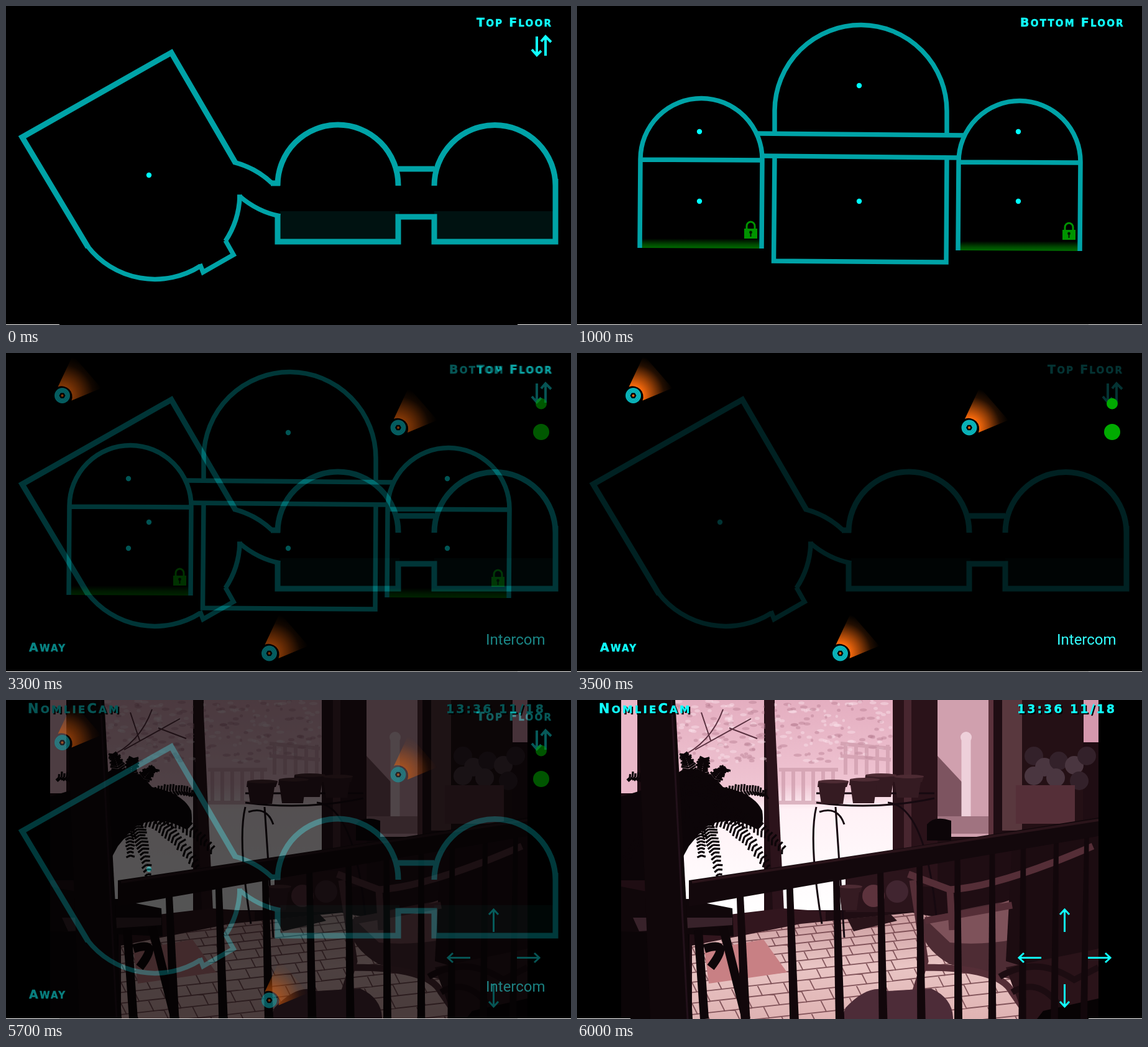
An HTML page for the animation above (8000 ms loop, 909 by 513 pixels).

```html
<!DOCTYPE html>
<html lang="en">
<head>
<meta charset="utf-8">
<title>House control panel</title>
<style>
  html, body { margin: 0; width: 100%; height: 100%; overflow: hidden; background: #000; }
  svg { display: block; width: 100vw; height: 100vh; isolation: isolate; }
  .layer { mix-blend-mode: plus-lighter; }
  .caps { font-family: "DejaVu Sans", sans-serif; font-weight: bold; stroke-width: .4; }
  .plain { font: 24px Roboto, sans-serif; fill: #3ff; }
  .wall { fill: none; stroke: #00a3a7; stroke-width: 9; }
  .thin { stroke-width: 7.5; }
  .arrow { fill: none; stroke: #1ff; stroke-width: 3; }
</style>
</head>
<body>
<svg id="stage" viewBox="0 0 909 513" xmlns="http://www.w3.org/2000/svg"></svg>
<script>
const FADES = [500, 3000, 5500], STEP = 100, STEPS = 6, LOOP = 8000;
const FLOOR = 'M185 395L360 360L540 342L839 400V513H185Z';
const stage = document.getElementById('stage');

const path = (d, attrs) => `<path d="${d}" ${attrs}/>`;
const wall = (d, thin) => path(d, `class="wall${thin ? ' thin' : ''}"`);
const shape = (d, fill) => path(d, `fill="${fill}"`);
const line = (d, color, width) => path(d, `fill="none" stroke="${color}" stroke-width="${width}"`);
const rect = (x, y, w, h, fill) => `<rect x="${x}" y="${y}" width="${w}" height="${h}" fill="${fill}"/>`;
const disc = (x, y, r, fill) => `<circle cx="${x}" cy="${y}" r="${r}" fill="${fill}"/>`;
const dot = (x, y) => disc(x, y, 4.2, '#0ff');
const layer = (id, body) => `<g id="${id}" class="layer">${body}</g>`;
const label = (x, y, words, big = 19, spacing = 2.2, color = '#1ff') => {
  const spans = words.replace(/[A-Z][a-z]*|[^A-Za-z]+/g, part =>
    `<tspan font-size="${big}">${part[0]}</tspan>` + (part.length > 1
      ? `<tspan font-size="${/[a-z]/.test(part) ? big * 0.79 : big}">${part.slice(1).toUpperCase()}</tspan>` : ''));
  return `<text class="caps" xml:space="preserve" x="${x}" y="${y}" letter-spacing="${spacing}" fill="${color}" stroke="${color}">${spans}</text>`;
};

function random(seed) {
  return () => (seed = (seed * 16807) % 2147483647) / 2147483647;
}

function topFloor() {
  return rect(441, 330, 192, 47, '#001211') + rect(689, 330, 191, 47, '#001211')
    + wall('M132 388L26 211L266 75L369 252')
    + wall('M366 251Q402 260 428 285', true) + wall('M426 285H441')
    + wall('M437 289V288A97 97 0 0 1 631 288V289M631 262H689M689 289A97.5 97.5 0 0 1 884 289M884 278V379H689V339H631V379H437V334')
    + wall('M441 338Q405 331 376 306', true)
    + wall('M372 307H376A137 137 0 0 1 353 378', true)
    + wall('M353 377L366 400L317 428L312 415', true)
    + wall('M313 418A137 137 0 0 1 131 386', true)
    + dot(230, 272) + label(757, 33, 'Top Floor')
    + path('M854 49V78M846 70L854 79L861 72M868 80V50M861 57L868 49L877 58', 'class="arrow" style="stroke-width:4"');
}

function lock(x, y) {
  return line(`M${x - 6.5} ${y - 1}V${y - 6}a6.5 7 0 0 1 13 0V${y - 1}`, '#009400', 3)
    + rect(x - 10.5, y - 2, 21, 16, '#009400') + disc(x, y + 4, 2.4, '#001800') + rect(x - 1, y + 5, 2, 6, '#001800');
}

function bottomFloor() {
  return shape('M104 374L295 375V390L104 389Z', 'url(#glow)') + shape('M616 378L807 379V394L616 393Z', 'url(#glow)')
    + wall('M318 206V168A138.5 138.5 0 0 1 595 170V207M318 241L316.5 410L594 412L595 243', true)
    + wall('M290 205L624 208M298 241L616 244', true)
    + wall('M101 389L102 246A98 98 0 0 1 298 247L297 390M102 247L298 248', true)
    + wall('M613 393L614 250A98 98 0 0 1 810 251L809 394M614 251L810 252', true)
    + [[197, 202], [197, 314], [454, 128], [454, 314], [710, 202], [710, 314]].map(p => dot(...p)).join('')
    + lock(279.5, 360) + lock(791.5, 362) + label(713, 33, 'Bottom Floor');
}

function camera(x, y) {
  return `<g transform="translate(${x} ${y})">`
    + shape('M-7 -14L17 -65L63 -12L15 8A17 17 0 0 0 -7 -14Z', 'url(#beam)')
    + disc(0, 0, 12.5, '#00a9b0')
    + [6, 8.5, 11].map(r => `<circle r="${r}" fill="none" stroke="#28c8cb" stroke-width=".7"/>`).join('')
    + shape('M-5 0L-2.5 -4.3H2.5L5 0L2.5 4.3H-2.5Z', '#000') + disc(0, 0, 2, '#e86510') + '</g>';
}

function controls() {
  return camera(90.5, 68.5) + camera(631, 120) + camera(423.5, 483)
    + disc(861, 81.5, 9, '#0a0') + disc(861, 127, 13, '#0a0')
    + label(37, 480, 'Away') + '<text class="plain" x="772" y="469">Intercom</text>';
}

function tiles() {
  let d = '';
  for (let row = 0, y = 330; y < 560; row++) {
    const depth = 11 + row * 0.9, width = 28 + row * 2;
    d += `M180 ${y + 45}L720 ${y - 15}`;
    for (let x = 185 + (row % 2) * width / 2; x < 720; x += width) {
      const top = y + 45 - (x - 180) / 9;
      d += `M${x} ${top}l${depth * 0.5} ${depth}`;
    }
    y += depth;
  }
  return shape(FLOOR, 'url(#floor)')
    + path(d, 'stroke="#6a3b43" stroke-width="1.8" opacity=".8" clip-path="url(#floorClip)"');
}

function fern() {
  const rnd = random(17);
  const tips = [[172, 88], [205, 95], [240, 112], [303, 152], [306, 268], [228, 280], [200, 250], [130, 205], [85, 125], [80, 255], [330, 240]];
  let d = '';
  for (const [x, y] of tips) {
    const angle = Math.atan2(y - 180, x - 195);
    for (let i = 4; i <= 22; i++) {
      const u = i / 22, bend = 70 * u * (1 - u);
      const px = 195 + (x - 195) * u + bend * Math.cos(angle) * 0.3, py = 180 + (y - 180) * u - bend;
      const reach = 5 + 10 * (1 - u) + 4 * rnd();
      for (const side of [angle + 1.2, angle - 1.2]) {
        d += `M${px} ${py}l${reach * Math.cos(side)} ${reach * Math.sin(side)}`;
      }
    }
  }
  return shape('M71 155Q130 140 170 112Q205 105 235 140Q285 150 298 178Q302 205 290 208Q245 182 205 205L180 235L150 290H71Z', '#0c0508')
    + line(d, '#0c0508', 3.2);
}

function foliage() {
  const rnd = random(5);
  let out = '';
  for (let i = 0; i < 260; i++) {
    const x = 160 + rnd() * 345, y = rnd() * 100;
    out += `<ellipse cx="${x.toFixed(1)}" cy="${y.toFixed(1)}" rx="${(2 + rnd() * 5).toFixed(1)}" ry="2.5" fill="${rnd() < 0.5 ? '#b97f92' : '#fbe3ec'}" opacity=".45"/>`;
  }
  return out + line('M165 92Q215 70 235 15M190 80L280 30M215 65L200 20M245 45L290 62', '#59303f', 2);
}

function fence() {
  const low = Array.from({length: 6}, (_, i) => `M${332 + i * 16} 110V165`);
  const high = Array.from({length: 5}, (_, i) => `M${432 + i * 17} 72V120`);
  return path('M325 112H420M325 165H420M424 70L505 78M424 90L505 96' + low.join('') + high.join(''),
    'fill="none" stroke="#c995a6" stroke-width="6" opacity=".6"');
}

function pot(x, y, w, h) {
  return shape(`M${x} ${y}h${w}l-3 9h-2l-4 ${h - 9}h${14 - w}l-4 ${9 - h}h-2Z`, '#351b22')
    + `<ellipse cx="${x + w / 2}" cy="${y}" rx="${w / 2}" ry="3" fill="#4d2b33"/>`;
}

function windows() {
  return rect(71, 0, 26, 150, '#eab8c9') + rect(158, 0, 143, 345, 'url(#view)')
    + rect(318, 0, 190, 338, 'url(#view)') + foliage() + fence()
    + shape('M301 0H317L334 360H316Z', '#2c131b') + rect(508, 0, 72, 300, '#2a1219') + rect(526, 0, 12, 240, '#48262f')
    + rect(580, 0, 82, 220, '#d0a0ae') + shape('M580 90L622 135V187H580Z', '#7d5460')
    + line('M626 60V187', '#eed0da', 15) + disc(626, 60, 9, '#eed0da')
    + rect(580, 187, 82, 28, '#a07380') + rect(662, 0, 8, 220, '#5b323c')
    + rect(684, 0, 32, 210, '#59383e') + rect(716, 0, 98, 210, '#241015') + rect(815, 0, 24, 68, '#d598ad');
}

function plants() {
  return [[735, 90], [752, 108], [775, 98], [800, 105], [820, 90], [770, 125], [808, 130], [735, 122]]
      .map(([x, y], i) => disc(x, y, 15, i % 2 ? '#4a3640' : '#33212a')).join('')
    + rect(706, 137, 95, 62, '#552f38')
    + line('M385 172Q372 225 394 360M416 172L430 382M500 165Q560 170 578 347M385 150H575M385 165Q480 178 575 158M390 180Q420 170 430 200', '#160910', 3)
    + pot(464, 121, 50, 35) + pot(510, 123, 48, 34) + pot(388, 131, 49, 36) + pot(439, 128, 48, 38)
    + shape('M563 226V200Q575 185 602 194V226Z', '#0c0508')
    + rect(432, 275, 110, 66, '#2b141b') + pot(421, 300, 38, 38) + disc(477, 315, 18, '#5d333d') + disc(515, 308, 18, '#412530')
    + shape('M435 352L505 345L515 355L445 372Z', '#2a141a');
}

function chair() {
  return shape('M548 355Q640 330 720 320L830 340V480Q700 450 600 425Q555 400 548 355Z', '#4e2c34')
    + shape('M560 352Q640 345 695 322L705 385Q650 395 600 390Z', '#7e525a')
    + shape('M700 235L839 220V400L790 450L690 420Z', '#1c0c11')
    + line('M533 280Q560 290 600 305Q680 300 830 235M540 290L560 420L538 490M600 305L604 370M560 430Q680 430 700 470L730 513M560 355L700 330', '#552e37', 11)
    + shape('M432 495Q470 455 500 468L570 464Q605 480 605 513H425Z', '#4d2c38')
    + shape('M690 430L839 400V513H720Z', '#2a1319')
    + line('M680 445Q740 410 800 450L839 430M700 470Q750 440 790 513', '#1c0c11', 10)
    + shape('M750 500L839 480V513H740Z', '#070304');
}

function railing() {
  const posts = [262, 342, 417, 488, 551, 612, 668, 718, 771, 820];
  return posts.map((x, i) => {
    const y = 318 - (x - 180) * 0.155, lean = 9 - i * 1.5, w = 11 - i * 0.4;
    return shape(`M${x - w / 2} ${y}h${w}L${x + w / 2 + lean + 2} 513h${-w - 4}Z`, '#12070b');
  }).join('')
    + shape('M180 290Q500 243 839 189V219Q500 276 180 332Z', '#13080c')
    + line('M185 293Q500 246 839 193', '#2a141a', 4);
}

function photo() {
  return '<g clip-path="url(#photoClip)">' + rect(71, 0, 768, 513, '#1f0d13') + windows()
    + shape('M185 352L330 335L400 340V358L200 400Z', '#32161e') + tiles()
    + shape('M205 402L300 385L338 438L212 456Z', '#c88084')
    + plants() + chair() + fern()
    + rect(71, 320, 110, 193, '#0b0507') + shape('M71 300L250 335L252 380L71 372Z', '#10070a')
    + shape('M90 350H250V362L100 372Z', '#38222a')
    + line('M195 370L205 513M235 365L272 513M150 365V513M205 400Q250 385 215 430', '#0e0609', 14)
    + railing() + shape('M97 0H158L186 513H118Z', '#10070a') + line('M152 0L178 513', '#22111a', 3) + '</g>';
}

function cameraView() {
  const heads = 'M784.5 373V338M777 345L784.5 337L792 345M784.5 457V492M777 485L784.5 493L792 485'
    + 'M747 414.5H712M719 407L711 414.5L719 422M822 414.5H857M850 407L858 414.5L850 422';
  const caption = (x, words, size, gap) => label(x + 2, 23, words, size, gap, '#000') + label(x, 21, words, size, gap);
  return photo() + caption(35, 'NomlieCam', 21, 3.2) + caption(708, '13:36 11/18', 19, 3) + path(heads, 'class="arrow"');
}

const gradient = (id, stops) => `<linearGradient id="${id}" x1="0" y1="0" x2="0" y2="1">`
  + stops.map(([at, color]) => `<stop offset="${at}" stop-color="${color}"/>`).join('') + '</linearGradient>';

stage.innerHTML = '<defs>' + gradient('glow', [[0, '#000'], [0.6, '#004a00'], [1, '#006c00']])
  + gradient('view', [[0, '#e4aec0'], [0.4, '#efc4d2'], [0.52, '#fff1f6'], [1, '#fff']])
  + gradient('floor', [[0, '#c99a9d'], [0.5, '#e9c5c4'], [1, '#dfb3b3']])
  + `<radialGradient id="beam" gradientUnits="userSpaceOnUse" cx="0" cy="0" r="64">
      <stop offset=".24" stop-color="#fa6a0c"/><stop offset=".5" stop-color="#fa6a0c" stop-opacity=".6"/>
      <stop offset=".78" stop-color="#fa6a0c" stop-opacity=".14"/><stop offset="1" stop-color="#fa6a0c" stop-opacity="0"/>
    </radialGradient>
    <clipPath id="photoClip"><path d="M71 0H839V513H71Z"/></clipPath>
    <clipPath id="floorClip"><path d="${FLOOR}"/></clipPath></defs>`
  + layer('bottom', bottomFloor()) + layer('room', cameraView()) + layer('top', topFloor())
  + `<g id="controls">${controls()}</g>`
  + rect(0, 512, 86, 1, '#fff') + rect(823, 512, 86, 1, '#fff')
  + `<g id="edge">${rect(86, 512, 737, 1, '#ddd')}</g>`;

const parts = Object.fromEntries(['top', 'bottom', 'controls', 'room', 'edge']
  .map(id => [id, document.getElementById(id)]));

function show(id, opacity) {
  parts[id].style.opacity = opacity;
  parts[id].style.display = opacity > 0 ? '' : 'none';
}

function render(t) {
  const level = [1, 0, 0, 0];
  let pulse = 0;
  FADES.forEach((start, i) => {
    if (t < start) return;
    const p = Math.min(STEPS, Math.floor((t - start) / STEP) + 1) / STEPS;
    level[i] = 1 - p;
    level[i + 1] = p ** 1.6;
    // The plan brightens while it is dissolved into or out of its dimmed state.
    pulse = i ? p * (1 - p) : 0;
  });
  show('top', level[0] + 0.2 * level[2] + pulse);
  show('bottom', level[1]);
  show('controls', level[2]);
  show('room', level[3]);
  show('edge', t >= 500 && t < 6000 ? 1 : 0);
}

const begin = performance.now();
function tick() {
  render((performance.now() - begin) % LOOP);
  requestAnimationFrame(tick);
}
tick();
</script>
</body>
</html>
```
